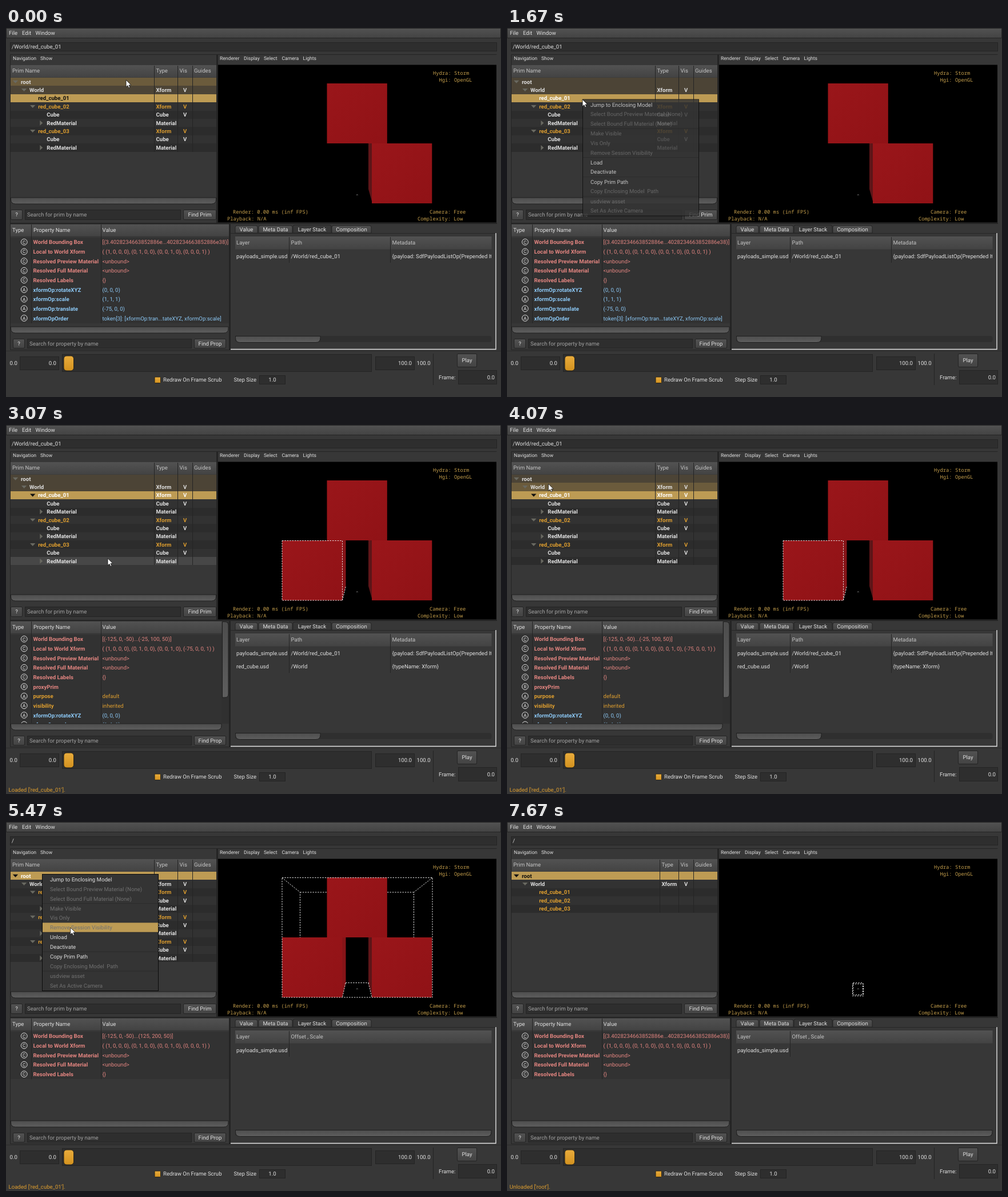
These frames come from a looping animation (866 by 646 pixels, 8.34 s). An HTML page:

```html
<!DOCTYPE html>
<html lang="en">
<head>
<meta charset="utf-8">
<title>Payload loading</title>
<style>
html, body { margin: 0; width: 100%; height: 100%; overflow: hidden; background: #373737; }
svg { display: block; width: 866px; height: 646px; font: 9.6px Roboto, "Open Sans", sans-serif; }
text { white-space: pre; text-rendering: geometricPrecision; }
.mono { font: 8.8px "Noto Sans Mono", "DejaVu Sans Mono", monospace; }
.small { font-size: 8.6px; }
</style>
</head>
<body>
<svg viewBox="0 0 866 646">
  <defs>
    <linearGradient id="raised" x2="0" y2="1"><stop stop-color="#525252"/><stop offset="1" stop-color="#434343"/></linearGradient>
    <linearGradient id="bar" x2="0" y2="1"><stop stop-color="#4d4d4d"/><stop offset="1" stop-color="#5e5e5e"/></linearGradient>
    <linearGradient id="amber" x2="0" y2="1"><stop stop-color="#e9ac3c"/><stop offset="1" stop-color="#d3921f"/></linearGradient>
    <linearGradient id="red" x2="1" y2="1"><stop stop-color="#9a161a"/><stop offset="1" stop-color="#901216"/></linearGradient>
    <clipPath id="propClip"><path d="M8 365H390V522H8Z"/></clipPath>
    <clipPath id="layerClip"><path d="M401 365H849V540H401Z"/></clipPath>
  </defs>
  <g id="base"></g>
  <g id="scene"></g>
  <g id="cursor"><path d="M0 0V12.3L2.9 9.7 4.8 13.9 6.8 13 5 8.9H8.9Z" fill="#fff" stroke="#111" stroke-width=".8"/></g>
</svg>
<script>
const LOOP = 8340, STEP = 1000 / 15;
const C = { text: '#e0e0e0', dim: '#a2a2a2', off: '#717171', orange: '#de9e2f', red: '#e38580',
  blue: '#8cc8f5', hud: '#c59f4c', gold: '#bd9b54', line: '#242424', field: '#2e2e2e', row: '#323232', rowAlt: '#2c2c2c' };
const $ = id => document.getElementById(id);
const esc = s => s.replace(/</g, '&lt;');

const text = (x, y, s, fill = C.text, attrs = '') =>
  `<text x="${x}" y="${y + 3.4}" fill="${fill}" ${attrs}>${esc(s)}</text>`;
const bold = (x, y, s, fill) => text(x, y, s, fill, 'font-weight="700"');
const mid = (x, y, s, fill) => text(x, y, s, fill, 'text-anchor="middle"');
const end = (x, y, s) => text(x, y, s, C.text, 'text-anchor="end"');
const rect = (x, y, x2, y2, fill, attrs = '') =>
  `<rect x="${x}" y="${y}" width="${x2 - x}" height="${y2 - y}" fill="${fill}" ${attrs}/>`;
const path = (d, fill, attrs = '') => `<path d="${d}" fill="${fill}" ${attrs}/>`;
const line = (d, color = C.line, width = 1) => path(d, 'none', `stroke="${color}" stroke-width="${width}"`);
const dashes = d => path(d, 'none', 'stroke="#e8e8e8" stroke-dasharray="2.4 2"');
const edged = `stroke="${C.line}"`;
const field = (x, y, x2, y2) => rect(x + .5, y + .5, x2 - .5, y2 - .5, C.field, edged);
const button = (x, y, x2, y2, s) =>
  rect(x + .5, y + .5, x2 - .5, y2 - .5, 'url(#raised)', edged + ' rx="1.5"') + mid((x + x2) / 2, (y + y2) / 2, s);
const scrollbar = (x, y, x2, h = 11) =>
  path(`M${x} ${y}H${x2}v${h - 8}q0 8 -8 8H${x + 8}q-8 0 -8 -8Z`, 'url(#bar)', 'stroke="#1f1f1f"');

function drawBase() {
  const tab = (x, x2, s, active) =>
    path(`M${x} 359V${active ? 348 : 349}q0 -3 3 -3H${x2 - 3}q3 0 3 3V359Z`, active ? '#373737' : 'url(#raised)', edged)
    + mid((x + x2) / 2, 352.8, s);
  const hud = (x, y, s) => text(x, y, s, C.hud, 'class="mono"');
  const menus = list => list.map(([x, s]) => text(x, 52.8, s, C.text, 'class="small"')).join('');
  return rect(0, 0, 866, 646, '#373737')
    + rect(.5, .5, 865.5, 17.5, 'url(#raised)', edged)
    + text(5, 8.8, 'File') + text(28, 8.8, 'Edit') + text(51.5, 8.8, 'Window')
    + field(7, 25, 859, 41)
    // splitter gaps
    + rect(368, 46, 371, 341, C.line) + rect(7, 341, 859, 343, C.line) + rect(390, 343, 393, 564, C.line)
    // prim browser
    + line('M7.5 341V46.5H368.5')
    + menus([[12, 'Navigation'], [60, 'Show']])
    + rect(8, 65, 368, 86.5, 'url(#raised)')
    + scrollbar(8.5, 297, 367.5)
    + button(8, 318, 29, 336, '?') + field(33, 318, 306, 336) + text(37, 327, 'Search for prim by name', C.dim)
    + button(310, 318, 368, 336, 'Find Prim')
    // viewport
    + line('M370.5 46.5H858.5')
    + menus([[374, 'Renderer'], [416, 'Display'], [451, 'Select'], [482.5, 'Camera'], [519.5, 'Lights']])
    + rect(371, 64.5, 858, 340.5, '#000')
    + hud(747, 79, 'Hydra: Storm') + hud(757.5, 90.5, 'Hgi: OpenGL')
    + hud(397, 322, 'Render: 0.00 ms (inf FPS)') + hud(387, 333.5, 'Playback: N/A')
    + hud(741, 322, 'Camera: Free') + hud(720, 333.5, 'Complexity: Low')
    // property panel
    + line('M7.5 343V563.5H390')
    + rect(8, 344, 390, 364.5, 'url(#raised)') + line('M44.5 344V365M166.5 344V365')
    + text(11, 354, 'Type') + text(48, 354, 'Property Name') + text(168.5, 354, 'Value')
    + button(12, 544, 33, 561, '?') + field(37, 544, 325, 561) + text(41, 552.5, 'Search for property by name', C.dim)
    + button(329, 544, 385, 561, 'Find Prop')
    // layer panel
    + line('M392.5 359.5H858', '#262626') + line('M393 562.5H857V359', '#e2e2e2', 1.4)
    + tab(401, 440, 'Value') + tab(442, 501, 'Meta Data') + tab(570, 639, 'Composition')
    + tab(502, 569, 'Layer Stack', true)
    + rect(401, 365, 849.5, 387.5, 'url(#raised)')
    + rect(401, 539, 849.5, 550, '#2f2f2f', 'rx="4"')
    // timeline
    + line('M0 565.5H866', '#2b2b2b')
    + text(6.5, 587, '0.0') + field(24, 575, 93, 599) + end(88, 587, '0.0')
    + field(98, 571, 640, 602)
    + rect(101, 574, 118.5, 600, 'url(#amber)', 'rx="5" stroke="#2a2418"')
    + field(646, 575, 715, 599) + end(710, 587, '100.0') + text(718.5, 587, '100.0')
    + line('M747.5 570V625') + button(789, 570, 824, 594, 'Play')
    + text(757, 611.5, 'Frame:') + field(791, 599, 859, 624) + end(855, 611.5, '0.0')
    + rect(260, 611, 270.5, 621.5, 'url(#amber)', 'stroke="#2a2418" rx="1"')
    + text(275, 616, 'Redraw On Frame Scrub') + text(398.5, 616, 'Step Size')
    + field(443, 608, 489, 624) + mid(466, 616, '1.0');
}

// Tree rows: [depth, name, type, has visibility, expander, highlighted as a model]
function treeRows(s) {
  const cube = (name, loaded) => loaded
    ? [[2, name, 'Xform', 1, 'down', 1], [3, 'Cube', 'Cube', 1], [3, 'RedMaterial', 'Material', 0, 'right']]
    : [[2, name, '', 0, '', 1]];
  return [[0, 'root', '', 0, 'down'], [1, 'World', 'Xform', 1, 'down'],
    ...cube('red_cube_01', s.loaded && !s.unloaded),
    ...cube('red_cube_02', !s.unloaded), ...cube('red_cube_03', !s.unloaded)];
}

function drawTree(s) {
  const typeX = s.unloaded ? 267.5 : 259.5, rows = treeRows(s);
  const rowTop = i => Math.round(87 + i * 14.4);
  const selected = s.rootPicked ? 0 : 2;
  const hover = s.menuAlpha || s.x > 368 ? -1 : Math.floor((s.y - 87) / 14.4);
  const out = rows.map(([depth, name, type, vis, arrow, model], i) => {
    const top = rowTop(i), y = 94.2 + i * 14.4, x = 26 + depth * 15.1, isSel = i === selected;
    const plain = i % 2 ? C.row : C.rowAlt;
    const fill = isSel ? C.gold : i < selected ? (i === hover ? '#6b5b3c' : '#4c4436') : i === hover ? '#474747' : plain;
    const ink = isSel ? (s.focused ? '#fff' : '#0c0c0c') : model ? C.orange : C.text;
    const ax = x - 9.5, aFill = isSel ? '#111' : '#696961';
    return rect(8, top, 368, rowTop(i + 1), fill)
      + (arrow === 'down' ? path(`M${ax - 4.7} ${y - 2.5}h9.4l-4.7 5Z`, aFill) : '')
      + (arrow === 'right' ? path(`M${ax - 2.5} ${y - 4.5}v9l5 -4.5Z`, aFill) : '')
      + bold(x, y, name, ink)
      + bold(typeX + 3, y, type, ink) + (vis ? bold(310, y, 'V', ink) : '');
  }).join('');
  const bottom = rowTop(rows.length);
  return out + line(`M${typeX} 66V${bottom}M300.5 66V${bottom}M326.5 66V${bottom}`)
    + text(11, 75, 'Prim Name', '#c4c4c4') + text(typeX + 3, 75, 'Type', '#c4c4c4')
    + text(303.5, 75, 'Vis', '#c4c4c4') + text(329, 75, 'Guides', '#c4c4c4');
}

function drawView(s) {
  const front = (x, y) => rect(x, y, x + 105.3, y + 105, 'url(#red)');
  const mark = line('M613 293l1.3 -1.8 1.3 1.8', '#8a8a8a', .8);
  if (s.unloaded) return mark + dashes('M604.5 283.5H623.5V304.5H604.5Z') + dashes('M605.5 281.5H622.5V302.5H605.5Z');
  return mark
    + path('M634 202H641V307L634 282Z', '#5d1518') + front(561.5, 97) + front(640, 202)
    + (s.loaded ? path('M588 202H594.5V282L588 307Z', '#861418') + front(483, 202) : '')
    + (s.viewRoot
      ? dashes('M483 97.5H746V307H483Z')
        + dashes('M483 97.5L514.5 123V202M514.5 123H561M746 97.5L713.5 123V202M713.5 123H667M594 281.5H635M594 282L588.5 307M634 282L640 307')
      : s.loaded ? dashes('M483 202.5H588.5V307H483ZM588.5 307L594.5 282') : '');
}

function drawProps(s) {
  const huge = '[(3.4028234663852886e...4028234663852886e38)]';
  const bounds = s.cleared || !s.bounded ? huge : s.propsRoot ? '[(-125, 0, -50)...(125, 200, 50)]' : '[(-125, 0, -50)...(-25, 100, 50)]';
  const shift = s.propsLoaded && !s.propsRoot ? '-75, 0, 0, 1' : '0, 0, 0, 1';
  const rows = [['C', 'World Bounding Box', bounds],
    ['C', 'Local to World Xform', `( (1, 0, 0, 0), (0, 1, 0, 0), (0, 0, 1, 0), (${shift}) )`],
    ['C', 'Resolved Preview Material', '<unbound>'], ['C', 'Resolved Full Material', '<unbound>'],
    ['C', 'Resolved Labels', '{}']].map(r => [...r, C.red]);
  const tall = s.propsLoaded && !s.propsRoot;
  if (tall) rows.push(['R', 'proxyPrim', '', C.red], ['A', 'purpose', 'default', C.orange],
    ['A', 'visibility', 'inherited', C.orange]);
  if (!s.propsRoot) rows.push(['A', 'xformOp:rotateXYZ', '(0, 0, 0)', C.blue], ['A', 'xformOp:scale', '(1, 1, 1)', C.blue],
    ['A', 'xformOp:translate', '(-75, 0, 0)', C.blue],
    ['A', 'xformOpOrder', 'token[3]: [xformOp:tran...tateXYZ, xformOp:scale]', C.blue]);
  const right = tall ? 377 : 389, H = 16.65;
  const cells = rows.map(([kind, name, value, ink], i) => {
    const y = 375 + i * H;
    return rect(8, Math.round(y - H / 2), right + 1, Math.round(y + H / 2), C.row)
      + `<circle cx="31.7" cy="${y - .3}" r="5.4" fill="none" stroke="#e4e4e4"/>`
      + text(31.7, y - .6, kind, '#eee', 'text-anchor="middle" font-size="8"')
      + bold(47.5, y, name, ink) + text(168.5, y, value, ink);
  }).join('');
  const bottom = 367 + rows.length * H;
  return `<g clip-path="url(#propClip)">${cells}${line(`M44.5 365V${bottom}M166.5 365V${bottom}`)}</g>`
    + scrollbar(8.5, 523, right)
    + (tall ? rect(377.5, 344, 390, 523, '#303030')
      + path('M378.5 344.5H383q6 0 6 6V471q0 6 -6 6h-4.5Z', 'url(#bar)', 'stroke="#1f1f1f"') : '');
}

function drawLayers(s) {
  const head = (x, label) => text(x, 376, label, '#c4c4c4');
  const first = head(403, 'Layer') + text(403, 399.7, 'payloads_simple.usd');
  if (s.propsRoot) return first + head(498.5, 'Offset , Scale') + line('M495.5 366V411') + scrollbar(401.5, 539.5, 849);
  const bottom = s.propsLoaded ? 434 : 411;
  return `<g clip-path="url(#layerClip)">` + first + head(498.5, 'Path') + head(675.5, 'Metadata')
    + text(498.5, 399.7, '/World/red_cube_01') + text(675.5, 399.7, '{payload: SdfPayloadListOp(Prepended Items')
    + (s.propsLoaded ? text(403, 422.5, 'red_cube.usd') + text(498.5, 422.5, '/World') + text(675.5, 422.5, '{typeName: Xform}') : '')
    + line(`M495.5 366V${bottom}M672.5 366V${bottom}`) + '</g>' + scrollbar(401.5, 539.5, 550);
}

function drawMenu(s) {
  if (!s.menuAlpha) return '';
  const [x, y] = s.rootPicked ? [63, 91] : [132, 124.5];
  const groups = [['Jump to Enclosing Model', '-Select Bound Preview Material (None)', '-Select Bound Full Material (None)'],
    ['-Make Visible', '-Vis Only', '-Remove Session Visibility'], [s.rootPicked ? 'Unload' : 'Load', 'Deactivate'],
    ['Copy Prim Path', '-Copy Enclosing Model  Path'], ['-usdview asset', '-Set As Active Camera']];
  let out = rect(x + .5, y + .5, x + 203.5, y + 204.5, '#343434', 'stroke="#0c0c0c"'), top = y + 1.5;
  groups.forEach((group, g) => {
    if (g) { out += line(`M${x + 1} ${top + .2}H${x + 203}`, '#2a2a2a', .8); top += .6; }
    for (const item of group) {
      const disabled = item[0] === '-', hot = s.menuAlpha === 1 && s.x > x + 1 && s.y >= top && s.y < top + 16.6;
      if (hot) out += rect(x + 1, top, x + 203, top + 16.6, C.gold);
      out += text(x + 14, top + 8.3, item.replace('-', ''), disabled ? C.off : hot ? '#222' : C.text);
      top += 16.65;
    }
  });
  return `<g opacity="${s.menuAlpha}">${out}</g>`;
}

// Pointer moves: first step, last step, destination
const moves = [[8, 17, 132, 125], [28, 36, 178, 233.5], [53, 64, 63, 91.5], [77, 85, 123, 204], [105, 114, 112, 613]];
function pointer(n) {
  let x = 210, y = 91;
  for (const [from, to, tx, ty] of moves) {
    if (n < from) break;
    const p = Math.min(1, (n - from + 1) / (to - from + 1)) ** .9;
    const e = p * p * p * (10 + p * (6 * p - 15));
    x += (tx - x) * e;
    y += (ty - y) * e;
  }
  return { x, y };
}

function stateAt(n) {
  const fade = start => [.2, .55, .84][n - start] ?? 1;
  return { ...pointer(n),
    focused: n >= 23 && n < 114, loaded: n >= 44, propsLoaded: n >= 45, bounded: n >= 46,
    rootPicked: n >= 66, viewRoot: n >= 67, propsRoot: n >= 67, unloaded: n >= 93, cleared: n >= 94,
    menuAlpha: n >= 23 && n < 43 ? fade(23) : n >= 67 && n < 93 ? fade(67) : 0 };
}

let shown = -1;
function render(t) {
  const n = Math.floor((t % LOOP + 4) / STEP);
  if (n === shown) return;
  shown = n;
  const s = stateAt(n);
  const status = s.unloaded ? "Unloaded ['root']." : s.loaded ? "Loaded ['red_cube_01']." : '';
  $('scene').innerHTML = text(10, 33, s.rootPicked ? '/' : '/World/red_cube_01') + drawTree(s) + drawView(s)
    + drawProps(s) + drawLayers(s) + text(4.5, 638.5, status, C.orange) + drawMenu(s);
  $('cursor').setAttribute('transform', `translate(${s.x} ${s.y})`);
  $('cursor').setAttribute('visibility', n < 115 ? 'visible' : 'hidden');
}

$('base').innerHTML = drawBase();
const start = performance.now();
function tick() {
  render(performance.now() - start);
  requestAnimationFrame(tick);
}
tick();
</script>
</body>
</html>
```
